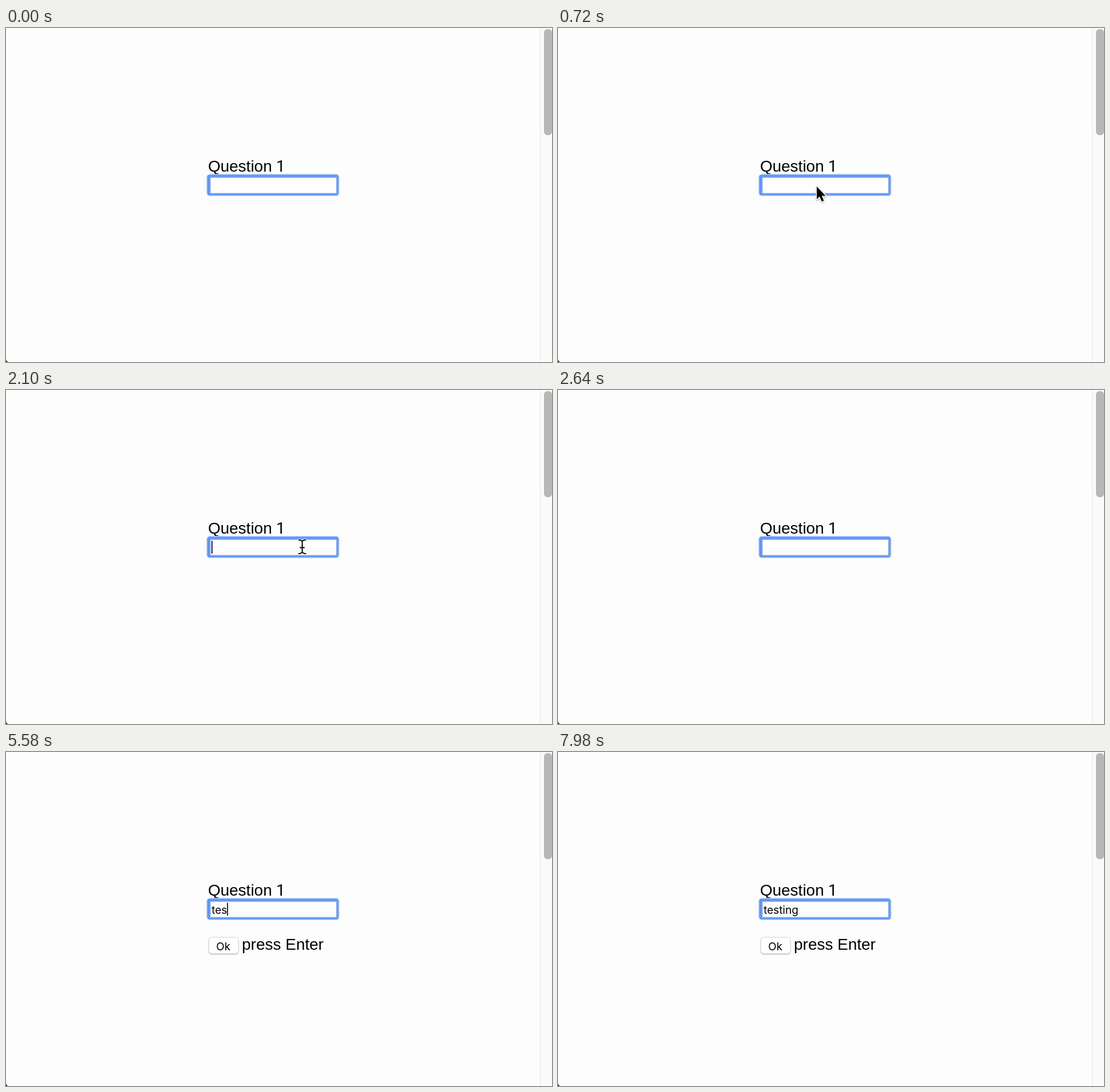
Recreate the animation shown at these times as an HTML page with a canvas. Size 956 by 586 pixels, loop 8 s.

```html
<!DOCTYPE html>
<html lang="en">
<head>
<meta charset="utf-8">
<style>
  html, body { margin: 0; width: 956px; height: 586px; overflow: hidden; }
  canvas { display: block; }
</style>
</head>
<body>
<canvas id="stage" width="956" height="586"></canvas>
<script>
const LOOP = 8000;
const ctx = document.getElementById('stage').getContext('2d');
const HELVETICA = '28px "Liberation Sans", Arial, sans-serif';
const SYSTEM = '19px Inter, sans-serif';
const ANSWER = 'testing';
const keyTimes = [4860, 5140, 5420, 6180, 6380, 6580, 6780];

const arrow = new Path2D('M0 0V22.5L5 17.8L9 26.5L12.6 25L8.8 16.4H15.6Z');
const beam = new Path2D('M-6-12Q-1-12 0-9Q1-12 6-12M0-9V9M-6 12Q-1 12 0 9Q1 12 6 12M-3.5 1.5H3.5');

const clamp = v => Math.max(0, Math.min(1, v));
const progress = (t, from, to) => clamp((t - from) / (to - from));
const smooth = p => p * p * (3 - 2 * p);
const lerp = (a, b, p) => a + (b - a) * p;
const bezier = (a, b, c, p) => lerp(lerp(a, b, p), lerp(b, c, p), p);

function box(x, y, w, h, r, color) {
  ctx.fillStyle = color;
  ctx.beginPath();
  ctx.roundRect(x, y, w, h, r);
  ctx.fill();
}

function text(str, x, y, font) {
  ctx.font = font;
  ctx.fillStyle = '#000';
  ctx.fillText(str, x, y);
}

function drawArrow(x, y) {
  ctx.save();
  ctx.translate(x, y);
  ctx.lineJoin = 'round';
  ctx.lineWidth = 3;
  ctx.strokeStyle = '#fff';
  ctx.shadowColor = 'rgba(0,0,0,.35)';
  ctx.shadowBlur = 3;
  ctx.shadowOffsetY = 1;
  ctx.stroke(arrow);
  ctx.shadowColor = 'transparent';
  ctx.fillStyle = '#000';
  ctx.fill(arrow);
  ctx.restore();
}

function drawBeam(x, y) {
  ctx.save();
  ctx.translate(x, y);
  ctx.lineCap = 'round';
  for (const [width, color] of [[4, '#fff'], [2, '#000']]) {
    ctx.lineWidth = width;
    ctx.strokeStyle = color;
    ctx.stroke(beam);
  }
  ctx.restore();
}

function drawPage() {
  box(0, 0, 956, 586, 0, '#fdfdfd');
  box(935, 0, 21, 586, 0, '#fafafa');
  box(935, 0, 1, 586, 0, '#e6e6e8');
  box(942, 2, 14, 186, 6, '#b7b7b7');

  // Rounded window corner
  ctx.fillStyle = '#000';
  ctx.beginPath();
  ctx.moveTo(0, 580);
  ctx.quadraticCurveTo(0, 586, 5, 586);
  ctx.lineTo(0, 586);
  ctx.fill();

  text('Question', 353.7, 252, HELVETICA);
  text('1', 473, 252, '28px Roboto, sans-serif');

  box(351, 256, 233, 39, 6, '#b9d2fb');
  box(352.5, 257.5, 229.5, 36, 4, '#5f96f7');
  box(357, 261.5, 222.5, 29, 1, '#9cb4dc');
  box(358.5, 263, 219.5, 26.5, 0, '#fefefe');
}

function drawButton() {
  box(354.5, 325, 53, 30.5, 6, '#b9b9b9');
  box(354.5, 324.5, 53, 30, 6, '#d2d2d2');
  box(355.5, 325.5, 51, 28, 5, '#fefefe');
  text('Ok', 368, 348, SYSTEM);
  text('press Enter', 413, 347, HELVETICA);
}

function caretVisible(t, typed) {
  if (typed === ANSWER.length) return t < 7980;
  if (typed) return t - keyTimes[typed - 1] < 500;
  return t >= 735 && (t - 735) % 1000 < 500;
}

function drawPointer(t) {
  if (t < 20 || t >= 2620) return;
  if (t < 820) {
    const p = Math.sin(progress(t, 20, 720) * Math.PI / 2);
    drawArrow(bezier(348, 540, 453, p), bezier(590, 390, 278, p));
  } else if (t < 2200) {
    const p = smooth(progress(t, 820, 1500));
    const q = smooth(progress(t, 1850, 2200));
    drawBeam(lerp(455, 509, p) + 12 * q, 267 + 10 * q);
  } else {
    const p = progress(t, 2200, 2400);
    const q = progress(t, 2450, 2620) ** 2;
    drawArrow(lerp(521, 535, p) + 90 * q, lerp(277, 288, p) + 300 * q);
  }
}

function draw() {
  const t = performance.now() % LOOP;
  const typed = keyTimes.filter(k => t >= k).length;
  const value = ANSWER.slice(0, typed);
  drawPage();
  if (typed) drawButton();
  text(value, 360, 284, SYSTEM);
  if (caretVisible(t, typed)) {
    box(359.8 + ctx.measureText(value).width, 264.5, 1.7, 22.5, 0, '#000');
  }
  drawPointer(t);
  requestAnimationFrame(draw);
}
draw();
</script>
</body>
</html>
```
